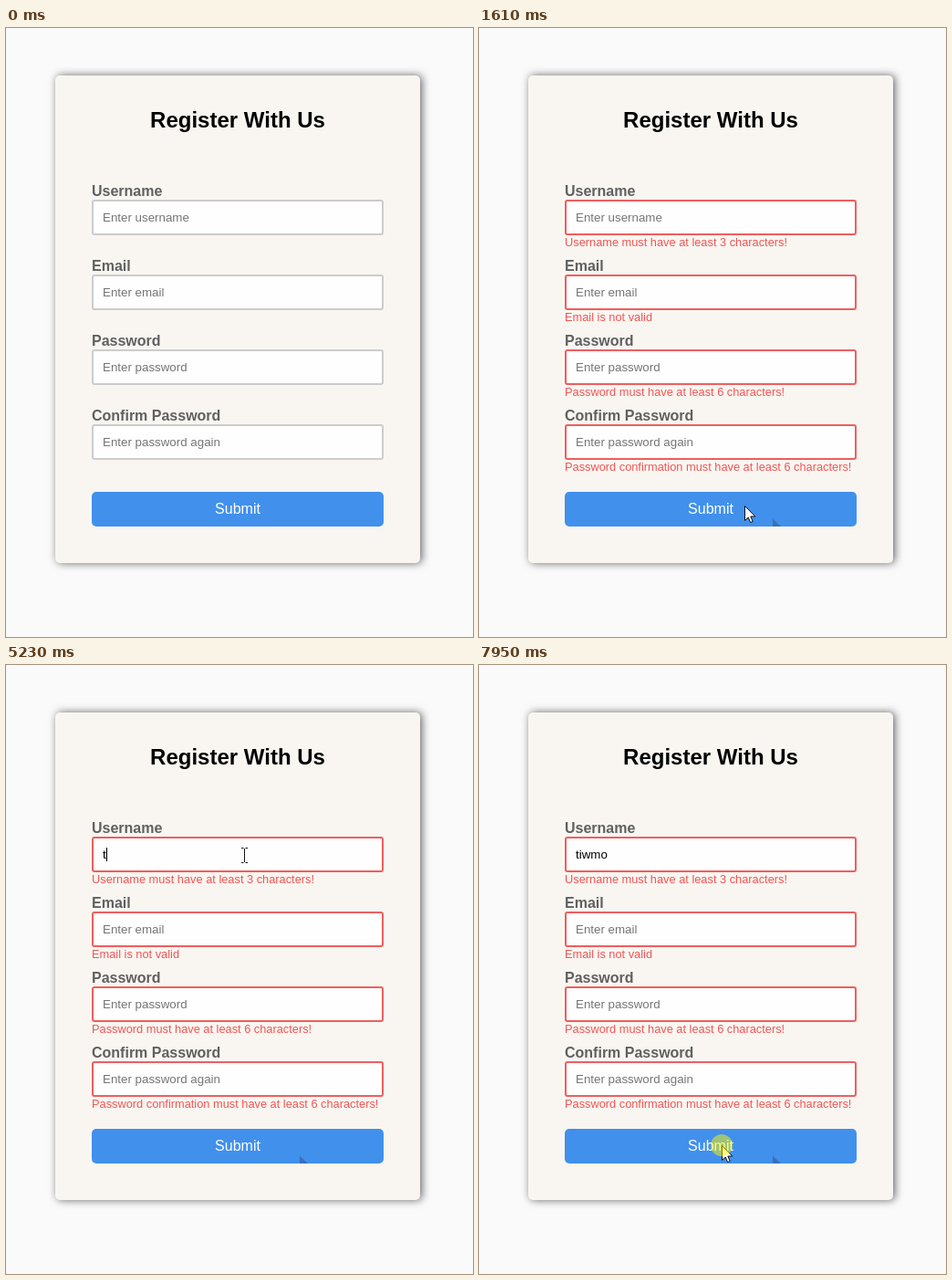
These frames come from a looping animation (512 by 667 pixels, 8000 ms). An HTML page:

```html
<!DOCTYPE html>
<html lang="en">
<head>
<meta charset="utf-8">
<title>Register form</title>
<style>
  html, body { margin: 0; width: 100%; height: 100%; overflow: hidden; background: #fafafa; }
  body { position: relative; font: 16px/18px "Liberation Sans", Arial, sans-serif; }
  body * { position: absolute; box-sizing: border-box; margin: 0; white-space: pre; }
  .card { left: 54px; top: 52px; width: 400px; height: 534px; border-radius: 5px;
    background: #f9f6f1; box-shadow: 2px 0 10px rgba(0, 0, 0, .6); }
  h2 { top: 35px; width: 100%; font-size: 24px; line-height: 27px; text-align: center; color: #000; }
  .field { left: 40px; width: 320px; height: 57px; }
  .label { font-weight: bold; color: #606060; }
  .box { top: 18px; width: 320px; height: 39px; border: 2px solid #ccc; border-radius: 3px; background: #fefefe; }
  .box span { left: 10px; top: 10px; height: 15px; font-size: 13.333px; line-height: 15px; color: #757575; }
  .box .value { color: #000; }
  #caret { left: 100%; top: 0; width: 1px; height: 15px; background: #000; }
  .error { top: 57px; font-size: 12.8px; line-height: 15px; color: #f05555; visibility: hidden; }
  .invalid .box { border-color: #ef5e5e; }
  .invalid .error { visibility: visible; }
  .button { left: 40px; top: 456px; width: 320px; height: 38px; border-radius: 5px;
    background: #4190ec; color: #fff; line-height: 37px; text-align: center; }
  svg { left: 0; top: 0; overflow: visible; }
  #halo { left: -12px; top: -12px; width: 24px; height: 24px; border-radius: 50%; background: rgba(255, 245, 0, .5); }
</style>
</head>
<body>
<div class="card">
  <h2>Register With Us</h2>
  <div class="button">Submit</div>
</div>
<svg id="smudge" width="1" height="1"><path d="M322 537.5V546H331Z" fill="#3a70b6"/></svg>
<svg id="arrow" width="13" height="20"><path d="M.5.5V16.5L4.2 13L6.7 18.6L9.2 17.5L6.8 12H11.8Z" fill="#fff" stroke="#111"/></svg>
<svg id="beam" width="1" height="1"><path d="M-3 -7.5H-.5M1.5 -7.5H4M.5 -7V8M-3 8.5H-.5M1.5 8.5H4" fill="none" stroke="#111"/></svg>
<div id="halo"></div>
<script>
const LOOP = 8000;
const $ = id => document.getElementById(id);
const card = document.querySelector('.card');

const fields = [
  ['Username', 'Enter username', 'Username must have at least 3 characters!'],
  ['Email', 'Enter email', 'Email is not valid'],
  ['Password', 'Enter password', 'Password must have at least 6 characters!'],
  ['Confirm Password', 'Enter password again', 'Password confirmation must have at least 6 characters!']
].map(([label, hint, error], i) => {
  const el = document.createElement('div');
  el.className = 'field';
  el.style.top = 118 + 82 * i + 'px';
  el.innerHTML = `<div class="label">${label}</div><div class="box"><span class="hint">${hint}</span></div>
<div class="error">${error}</div>`;
  card.append(el);
  return el;
});

const hint = fields[0].querySelector('.hint');
const value = document.createElement('span');
const typed = document.createTextNode('');
const caret = document.createElement('i');
value.className = 'value';
caret.id = 'caret';
value.append(typed, caret);
hint.after(value);

const NAME = 'tiwmo';
const TYPE_START = 5230, KEY_GAP = 182, BLINK = 530;

// Mouse button down and up: empty submit, focus on the first field, second submit.
const PRESSES = [[1480, 1600], [3640, 3840], [7880, LOOP]];
const SUBMIT = PRESSES[0][1], FOCUS = PRESSES[1][0], BLUR = PRESSES[2][0];

// Each visit of the pointer is a chain of curved, decelerating moves.
const VISITS = [
  { span: [330, 2400], from: [413, 655], moves: [
    { start: 330, end: 1080, via: [370, 552], to: [291, 523] },
    { start: 1640, end: 2020, via: [400, 565], to: [460, 539] }
  ] },
  { span: [3170, LOOP], from: [392, 317], moves: [
    { start: 3170, end: 3570, via: [315, 245], to: [261, 208] },
    { start: 6510, end: 6740, via: [360, 208], to: [441, 226] },
    { start: 6740, end: 7110, via: [290, 245], to: [263, 413] },
    { start: 7110, end: 7860, via: [262, 413], to: [266, 526] }
  ] }
];

const within = (t, [a, b]) => t >= a && t < b;
const show = (el, on) => el.style.visibility = on ? 'visible' : 'hidden';
const easeOut = k => 1 - (1 - k) ** 2;
const bezier = (a, b, c, e) => (1 - e) ** 2 * a + 2 * e * (1 - e) * b + e * e * c;

function pointerAt(t) {
  const visit = VISITS.find(v => within(t, v.span));
  if (!visit) return null;
  let p = visit.from;
  for (const { start, end, via, to } of visit.moves) {
    if (t < start) break;
    const e = easeOut(Math.min(1, (t - start) / (end - start)));
    p = p.map((v, i) => bezier(v, via[i], to[i], e));
  }
  return p.map(Math.round);
}

const overInput = ([x, y]) => x > 94 && x < 414 && y > 188 && y < 473 && (y - 188) % 82 < 39;

function draw(t) {
  const invalid = t >= SUBMIT;
  fields.forEach(f => f.classList.toggle('invalid', invalid));
  show($('smudge'), invalid);

  const keys = Math.floor((t - TYPE_START) / KEY_GAP) + 1;
  const count = Math.max(0, Math.min(NAME.length, keys));
  typed.data = NAME.slice(0, count);
  show(hint, !count);
  const lastInput = count ? TYPE_START + (count - 1) * KEY_GAP : FOCUS;
  show(caret, within(t, [FOCUS, BLUR]) && Math.floor((t - lastInput) / BLINK) % 2 === 0);

  const p = pointerAt(t);
  const text = p && overInput(p);
  show($('arrow'), p && !text);
  show($('beam'), text);
  show($('halo'), PRESSES.some(span => within(t, span)));
  if (p) {
    for (const id of ['arrow', 'beam', 'halo']) $(id).style.transform = `translate(${p[0]}px, ${p[1]}px)`;
  }
}

const start = performance.now();
function tick() {
  draw((performance.now() - start) % LOOP);
  requestAnimationFrame(tick);
}
tick();
</script>
</body>
</html>
```
